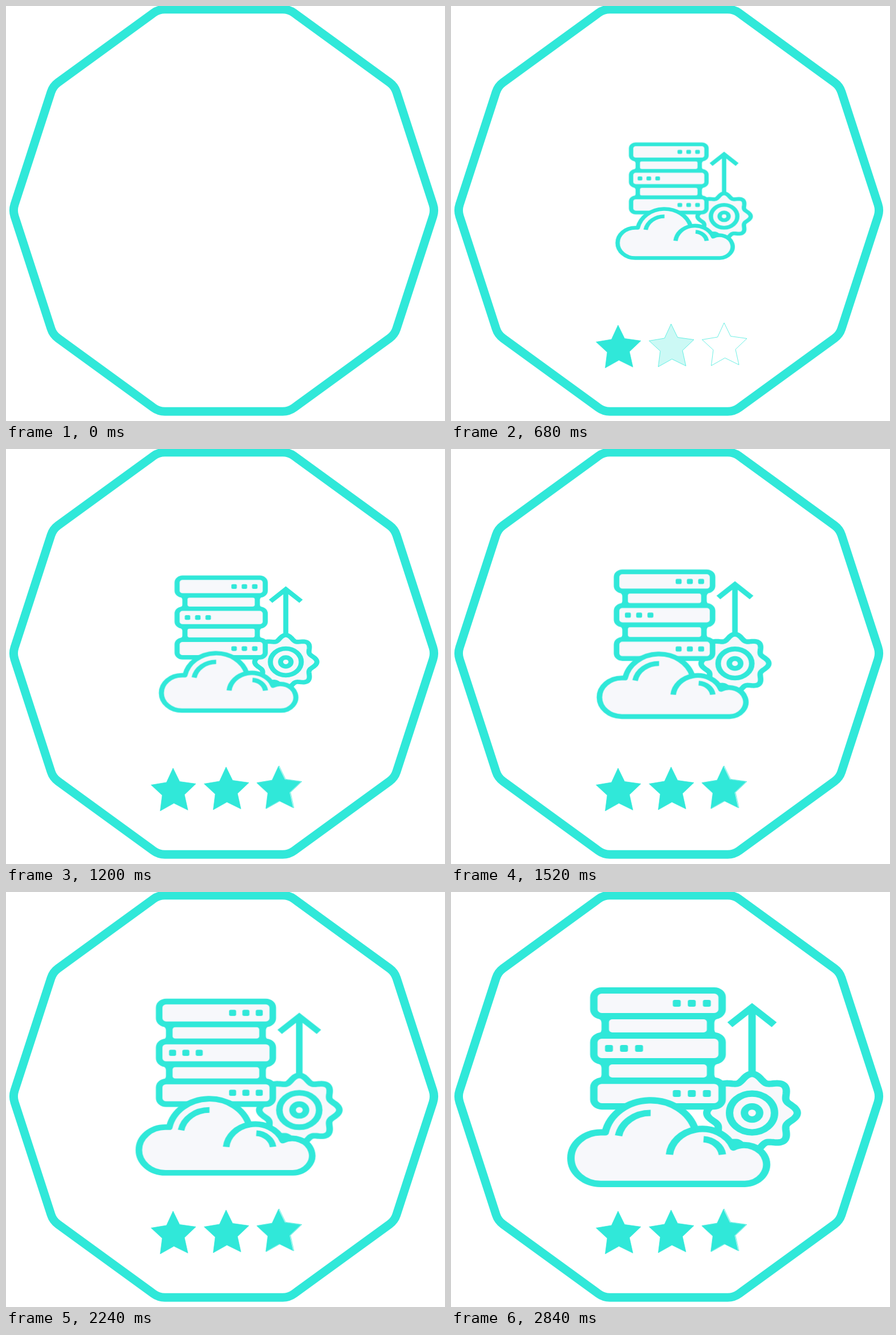
These frames come from a looping animation (770 by 727 pixels, 2.88 s). An HTML page:

```html
<!DOCTYPE html>
<html lang="en">
<head>
<meta charset="utf-8">
<title>Cloud server badge</title>
<style>
  html, body { margin: 0; width: 100%; height: 100%; overflow: hidden; background: #fff; }
  svg { display: block; width: 770px; height: 727px; }
  .line { fill: none; stroke: #30e8d9; }
  .body { fill: #f7f8fb; stroke: #30e8d9; }
  .solid { fill: #30e8d9; }
  .pale { fill: #f7f8fb; }

  .scene { animation: show 2880ms step-end infinite; }
  .zoom { transform-origin: 409px 342px; animation: zoom 2880ms linear infinite; }
  .fill1 { animation: fill1 2880ms linear infinite; }
  .fill2 { animation: fill2 2880ms linear infinite; }
  .fill3 { animation: fill3 2880ms linear infinite; }

  @keyframes show { 0% { visibility: hidden; } 1.35%, 100% { visibility: visible; } }
  @keyframes zoom { from { transform: scale(.458); } to { transform: scale(1.0076); } }
  @keyframes fill1 { 0%, 12.85% { opacity: 0; } 21.53%, 100% { opacity: 1; } }
  @keyframes fill2 { 0%, 21.53% { opacity: 0; } 30.21%, 100% { opacity: 1; } }
  @keyframes fill3 { 0%, 30.21% { opacity: 0; } 38.8%, 100% { opacity: 1; } }
</style>
</head>
<body>
<svg viewBox="0 0 770 727">
  <defs>
    <path id="star" d="M293 559L304.500 582.500L333 586.500L313 605.500L319 632.500L294.500 620.500L270.500 634L274 606.500L254.500 588.500L281.500 584Z"/>
    <rect id="unit" class="body" x="40.100" y="6.500" width="194" height="45" rx="12"/>
    <g id="joint">
      <path class="solid" d="M44 54q7.700 3 7.700 9v12q0 6 -7.700 9H230q-7.700 -3 -7.700 -9v-12q0 -6 7.700 -9z"/>
      <rect class="pale" x="63" y="57" width="148" height="23" rx="5"/>
    </g>
    <g id="dots" class="solid">
      <rect width="12" height="12" rx="3"/>
      <rect x="22.700" width="12" height="12" rx="3"/>
      <rect x="45.500" width="12" height="12" rx="3"/>
    </g>
  </defs>

  <path id="frame" class="line" stroke-width="15"/>

  <g class="scene">
    <g class="zoom">
      <g transform="translate(204 166) scale(1.16 1)" stroke-width="11.200">
        <path class="line" d="M279.300 36V152M245.800 66.500L279.300 36L312.800 66.500"/>
        <g transform="translate(279.300 221)">
          <path id="gear" class="body"/>
          <circle class="line" r="34"/>
          <circle class="line" r="11.500"/>
        </g>

        <g stroke="none">
          <use href="#joint"/>
          <use href="#joint" y="79"/>
        </g>
        <use href="#unit"/>
        <use href="#unit" y="79"/>
        <use href="#unit" y="158"/>
        <g stroke="none">
          <use href="#dots" x="159.500" y="23"/>
          <use href="#dots" x="57" y="102"/>
          <use href="#dots" x="159.500" y="181"/>
        </g>

        <path class="body" stroke-linejoin="round" d="M50.600 345.300A45.150 45.150 0 0 1 50.600 255H57.400A70 70 0 0 1 193.500 250.200A50 50 0 0 1 251 281.500A34 34 0 1 1 268.500 345.300Z"/>
        <path class="line" d="M154.500 294A50 50 0 0 1 193.500 250.200"/>
        <path class="line" d="M77.500 261A49 49 0 0 1 126 221"/>
        <path class="line" d="M206 267A31 31 0 0 1 234.500 294"/>
      </g>
    </g>

    <g class="line" stroke-width=".7">
      <use href="#star"/>
      <use href="#star" x="93" y="-2"/>
      <use href="#star" x="186" y="-4"/>
    </g>
    <g class="solid">
      <use class="fill1" href="#star"/>
      <use class="fill2" href="#star" x="93" y="-2"/>
      <use class="fill3" href="#star" x="184.800" y="-3.800"/>
    </g>
  </g>
</svg>
<script>
  const polar = (radius, angle) => [radius * Math.cos(angle), radius * Math.sin(angle)];

  // Regular polygon whose corners are softened by a quadratic curve.
  function roundedPolygon(cx, cy, radius, sides, cut) {
    const corners = Array.from({ length: sides }, (_, i) => {
      const [x, y] = polar(radius, i * 2 * Math.PI / sides);
      return [cx + x, cy + y];
    });
    const toward = (a, b) => {
      const k = cut / Math.hypot(b[0] - a[0], b[1] - a[1]);
      return [a[0] + (b[0] - a[0]) * k, a[1] + (b[1] - a[1]) * k];
    };
    return corners.map((corner, i) => {
      const before = toward(corner, corners[(i + sides - 1) % sides]);
      const after = toward(corner, corners[(i + 1) % sides]);
      return `${i ? 'L' : 'M'}${before}Q${corner} ${after}`;
    }).join('') + 'Z';
  }

  function wavyCircle(radius, depth, teeth) {
    const steps = 240;
    const points = Array.from({ length: steps }, (_, i) => {
      const angle = i * 2 * Math.PI / steps;
      return polar(radius + depth * Math.cos(teeth * angle), angle);
    });
    return 'M' + points.join('L') + 'Z';
  }

  document.getElementById('frame').setAttribute('d', roundedPolygon(382, 358, 370.3, 10, 11));
  document.getElementById('gear').setAttribute('d', wavyCircle(62.2, 6.2, 8));
</script>
</body>
</html>
```
